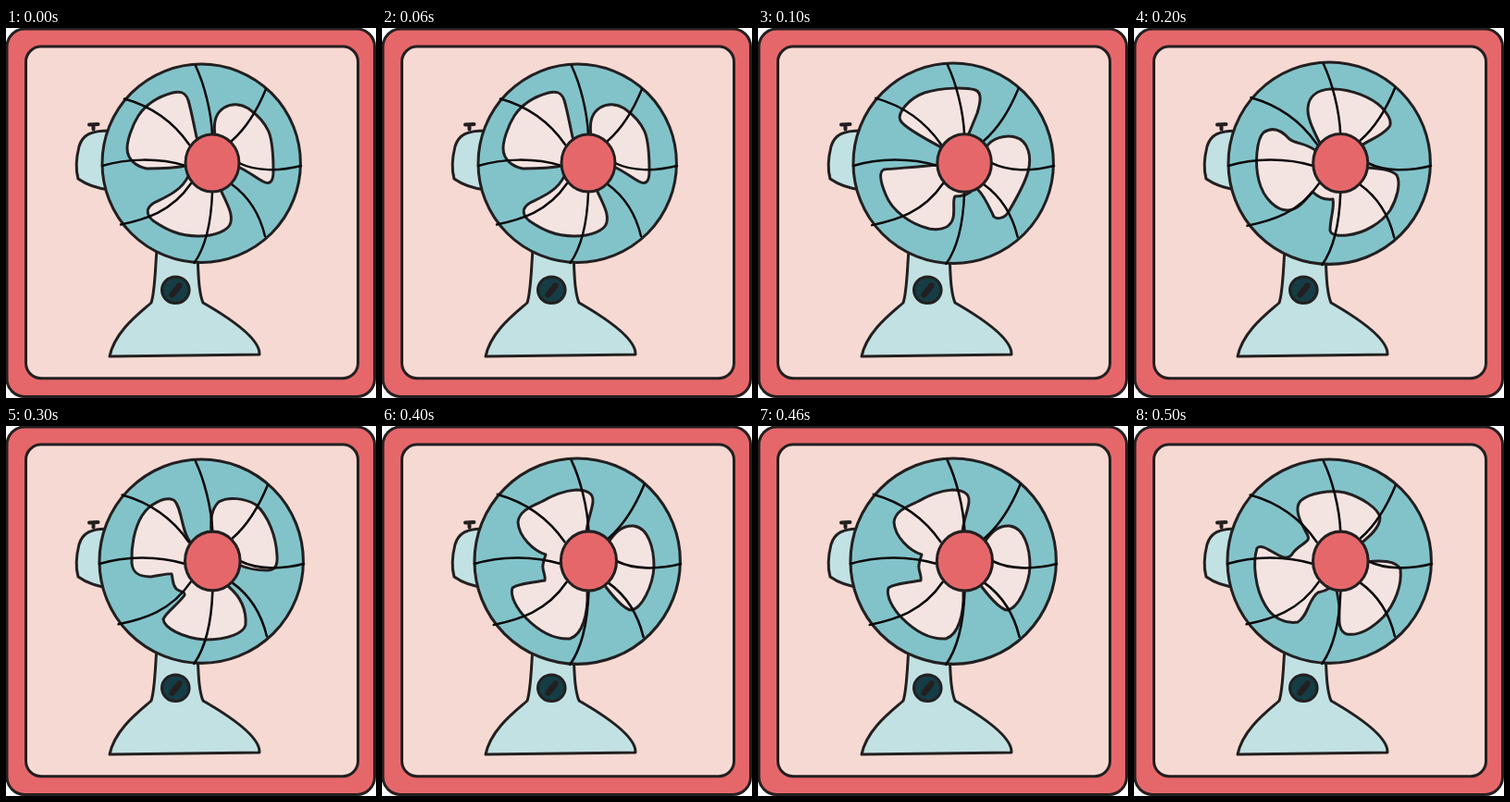
An HTML page for the animation above (0.6 s loop, 400 by 400 pixels).

```html
<!DOCTYPE html>
<html lang="en">
<head>
<meta charset="utf-8">
<title>Desk fan</title>
<style>
  html, body { margin: 0; width: 100%; height: 100%; overflow: hidden; background: #fff; }
  svg { display: block; width: 100vw; height: 100vh; }
  .ink { stroke: #231f20; stroke-width: 3; stroke-linecap: round; stroke-linejoin: round; }
  .wire { fill: none; stroke: #0c0a0b; stroke-width: 2.5; stroke-linecap: round; }
</style>
</head>
<body>
<svg viewBox="0 0 400 400">
  <rect class="ink" x="1" y="1" width="397.5" height="397.5" rx="19" fill="#e6676a"/>
  <rect class="ink" x="21.5" y="20" width="359" height="358.7" rx="16.5" fill="#f6d9d2"/>

  <!-- stand -->
  <path class="ink" fill="#c2e1e3" d="M163 240C161 265 161 285 157 297C146 307 118 327 112 355L274 353C275 337 246 316 213 297C208 285 208 265 207 245Z"/>
  <ellipse class="ink" fill="#153d45" cx="183.3" cy="283.3" rx="14.8" ry="14.3"/>
  <path class="ink" fill="none" style="stroke-width:6.5" d="M179.5 288.5L187.5 278.5"/>

  <!-- motor -->
  <path class="ink" fill="#c2e1e3" d="M112 111C92 111 83 115 79 128C76 140 75.500 154 78 163C85 168 95 173 112 175Z"/>
  <path class="ink" fill="none" style="stroke-width:4" d="M90 104.500L99.500 104M94.500 105V109.500"/>

  <circle class="ink head" cx="211.2" cy="146.2" r="107.2" fill="#82c3ca"/>

  <!-- one pose of the blades per step -->
  <g class="ink" fill="#f4e4e1">
    <path class="pose" d="M206 118C203 104 200 88 197 78C194 69 188 68 180 70C165 74 151 83 143 95C136 106 131 122 131 130C131 143 142 150 152 152C168 152 180 152 195 149L223 146Z
      M226 116C224 103 226 92 236 86C244 81 254 82 262 87C272 94 280 103 284 112C288 122 289 140 289 155C289 168 284 169 278 166C270 162 262 155 251 150L223 146Z
      M197 160C190 176 172 183 160 189C150 195 152 203 160 209C172 217 186 225 208 225C226 225 241 219 243 210C245 201 240 192 233 177L223 146Z"/>
    <path class="pose" d="M200 130C185 122 158 108 154 100C150 92 163 76 180 70C200 64 225 64 235 67C243 70 240 82 237 92L228 114L223 146Z
      M247 129C252 119 268 115 278 118C293 122 296 140 292 155C288 170 276 190 270 200C266 206 258 207 255 204C250 194 245 182 238 175L223 146Z
      M195 148C175 150 145 152 136 153C130 156 133 168 138 180C145 198 165 212 185 217C200 220 209 214 211 205C213 196 210 186 213 182C220 182 226 180 230 177L223 146Z"/>
    <path class="pose" d="M201 125C195 112 187 98 188 86C189 74 198 67 212 66C235 65 258 76 268 86C276 95 280 103 275 108C267 117 258 119 246 127L223 146Z
      M252 151C265 152 278 153 284 159C289 168 284 185 277 197C268 210 250 222 230 224C222 225 213 224 212 219C212 205 217 195 215 185C208 186 200 184 193 177C185 186 178 196 167 197C155 198 140 185 135 165C130 145 133 120 140 113C150 106 160 111 168 120C176 126 186 124 197 133L223 146Z"/>
    <path class="pose" d="M200 126C190 118 190 85 181 80C172 76 155 84 147 97C139 110 135 130 136 148C137 160 145 163 156 163C165 162 176 159 179 160C181 166 179 170 184 176C188 180 194 178 193 183C186 193 172 202 170 209C171 218 190 229 215 231C240 231 257 224 259 215C260 200 254 185 241 174L223 146Z
      M222 116C221 100 222 90 230 82C240 76 258 78 270 85C284 97 292 120 293 140C294 152 290 156 282 156C272 156 262 155 252 150L223 146Z"/>
    <path class="pose" d="M221 116C221 105 227 92 228 82C229 72 220 69 210 69C194 70 182 77 172 82C161 87 148 92 147 104C148 120 164 135 177 139C175 146 173 150 174 154C175 160 177 163 176 167C165 169 147 170 141 175C138 184 146 198 156 208C168 220 185 231 203 230C216 226 223 205 222 178L223 146Z
      M246 124C254 112 262 107 272 108C288 110 294 132 294 152C293 172 281 198 269 199C262 198 252 187 242 174L223 146Z"/>
    <path class="pose" d="M245 127C254 120 266 110 266 99C264 89 246 77 228 72C212 69 190 72 180 81C173 89 179 102 184 111C186 116 190 119 188 123C184 128 176 131 172 137C168 144 162 143 157 140C148 136 138 127 133 132C128 148 131 176 142 194C150 208 164 214 177 212C188 206 189 186 199 180C204 179 209 177 212 175L223 146Z
      M252 147C264 145 284 145 288 155C290 172 282 192 270 206C256 220 242 227 230 225C220 222 222 208 222 198C222 190 220 184 219 177L223 146Z"/>
  </g>

  <g class="head">
    <path class="wire" d="M205 41C214 60 222 90 223 116M128 76.500C155 84 180 100 198 126M104 149C130 141 165 140 194 149M124 212.500C150 207 179 199 200 168M223 178C222 205 217 235 203.500 254M244 169C262 182 274 200 280 225M252 146C270 155 295 155 319 149M281 66C272 88 260 108 244 122"/>
    <ellipse class="ink" cx="223" cy="146" rx="29" ry="31" fill="#e6676a"/>
  </g>
</svg>
<script>
  const STEP = 100, RADIUS = 107.5, CX = 211.5, CY = 146.5;
  const poses = document.querySelectorAll('.pose');
  const heads = document.querySelectorAll('.head');

  function draw(time) {
    const step = Math.floor(time / STEP) % poses.length;
    // the head swells for four steps, then shrinks back
    const scale = (RADIUS + 4 - Math.abs(4 - step)) / RADIUS;
    const grow = `translate(${CX} ${CY}) scale(${scale}) translate(${-CX} ${-CY})`;
    heads.forEach(el => el.setAttribute('transform', grow));
    poses.forEach((el, i) => el.setAttribute('visibility', i === step ? 'visible' : 'hidden'));
  }

  const start = performance.now();
  function tick() {
    draw(performance.now() - start);
    requestAnimationFrame(tick);
  }
  tick();
</script>
</body>
</html>
```
